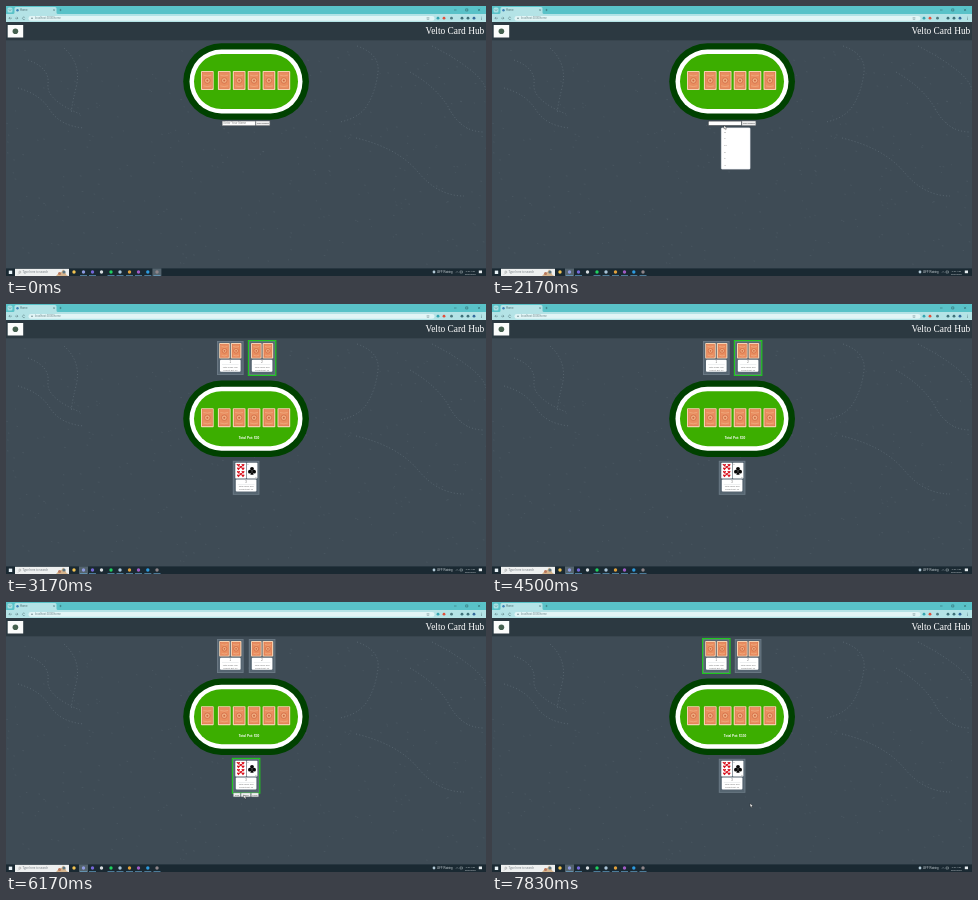
An HTML page for the animation above (8 s loop, 480 by 270 pixels).

```html
<!DOCTYPE html>
<html lang="en">
<head>
<meta charset="utf-8">
<title>Card table</title>
<style>
html, body { margin: 0; width: 100%; height: 100%; overflow: hidden; background: #3e4b55; }
svg { display: block; width: 100vw; height: 100vh; }
text { font-family: "Liberation Sans", Arial, sans-serif; }
.serif { font-family: "Liberation Serif", "Times New Roman", serif; }
</style>
</head>
<body>
<svg id="stage" viewBox="0 0 480 270"></svg>
<script>
const LOOP = 8000, STEP = 1000 / 6;
const stage = document.getElementById('stage');

const rect = (x, y, w, h, fill, more = '') =>
  `<rect x="${x}" y="${y}" width="${w}" height="${h}" fill="${fill}" ${more}/>`;
const dot = (x, y, r, fill, more = '') =>
  `<circle cx="${x}" cy="${y}" r="${r}" fill="${fill}" ${more}/>`;
const label = (x, y, size, fill, str, more = '') =>
  `<text x="${x}" y="${y}" font-size="${size}" fill="${fill}" ${more}>${str}</text>`;
const path = (d, stroke, width, more = '') =>
  `<path d="${d}" fill="none" stroke="${stroke}" stroke-width="${width}" ${more}/>`;
const group = (id, body, more = '') => `<g id="${id}" ${more}>${body}</g>`;
const MID = 'text-anchor="middle"';

function seeded(seed) {
  return () => (seed = (seed * 16807) % 2147483647) / 2147483647;
}

// Dotted contour lines and loose specks over the page background
function contours() {
  const lines = [
    'M22 54Q44 62 42 78T74 108', 'M58 42Q76 58 70 82T66 108', 'M12 82Q34 88 44 104T78 122',
    'M351 40Q374 48 372 66T362 98Q354 112 334 116', 'M426 40Q446 50 462 62T480 84',
    'M404 66Q432 82 444 104T478 126', 'M350 132Q392 142 412 166T458 190'
  ];
  const rnd = seeded(71);
  let specks = '';
  for (let i = 0; i < 330; i++) {
    const x = rnd() * 480, y = 44 + rnd() * 216;
    specks += `M${x.toFixed(1)} ${y.toFixed(1)}l${(0.8 + rnd()).toFixed(1)} .3`;
  }
  return path(specks, '#6f7e89', 0.5, 'opacity=".42"') +
    lines.map(d => path(d, '#82909a', 0.65, 'stroke-dasharray="1 2.2" opacity=".6"')).join('');
}

function browser() {
  const icons = [[432, '#34a4b0'], [438, '#e0503c'], [445.5, '#4d7b81'], [456, '#3d7078'], [462, '#3d7078'], [468, '#336a9c']];
  return rect(0, 0, 480, 8, '#59c2c8') +
    rect(1.5, 1.5, 5, 5, '#a5e0e3', 'rx="1.5"') + path('M3 3.5l1 1 1-1', '#31545a', 0.5) +
    `<path d="M7 8q1.5 0 1.5-1.5V2.5q0-1.5 1.5-1.5H49q1.5 0 1.5 1.5V6.5q0 1.5 1.5 1.5z" fill="#b4e3e6"/>` +
    dot(11.5, 4.2, 1.2, '#3c7fb5') + label(14, 5.2, 2.8, '#4a676b', 'Home') +
    path('M47.2 3.2l1.7 1.7m0-1.7l-1.7 1.7M53.4 4h2.2M54.5 2.9v2.2', '#28474c', 0.35) +
    path('M448 4h2.5M459.7 2.9h2.1v2.1h-2.1zM472 2.9l2.1 2.1m0-2.1l-2.1 2.1', '#1f4449', 0.4) +
    rect(0, 8, 480, 8, '#b4e3e6') +
    path('M6 12.2H2.9l1.2-1.2M2.9 12.2l1.2 1.2M9 12.2h3l-1.2-1.2M12 12.2l-1.2 1.2M18.8 11.5a1.3 1.3 0 1 0 .2 1.4', '#4a6a6f', 0.45) +
    rect(22.5, 9.9, 406, 4.9, '#e2f5f6', 'rx="2.4"') + dot(26, 12.3, 0.8, '#6d878b') +
    label(29, 13.3, 2.8, '#718a8e', 'localhost:3000/home') +
    path('M422 11l.4 1h1l-.8.7.3 1-.9-.6-.9.6.3-1-.8-.7h1z', '#56757a', 0.3) +
    icons.map(([x, c]) => dot(x, 12.2, 1.4, c)).join('') +
    [11, 12.2, 13.4].map(y => dot(475.5, y, 0.35, '#28474c')).join('');
}

function header() {
  return rect(0, 16, 480, 18.3, '#2c3941') +
    rect(1.7, 19, 15.5, 12.5, '#fbfcfb') + dot(9.4, 25.3, 2.8, '#45614f') +
    label(478.3, 28.4, 9.4, '#fff', 'Velto Card Hub', 'class="serif" text-anchor="end"');
}

function taskbar() {
  const apps = [[68, '#f3c451'], [77.5, '#8f9be0'], [86.5, '#7567d8'], [95.5, '#d9dde0'], [105, '#1ed15f'],
    [114, '#a9c4d8'], [123.5, '#e2a13c'], [132.5, '#a15bc4'], [141.8, '#2d9be0'], [151, '#8f8589']];
  return rect(0, 262.4, 480, 7.6, '#1a2932') + rect(2.8, 264.6, 3.4, 3.4, '#e8f2f7') +
    rect(9, 262.8, 54, 7.2, '#eef0f0') + path('M13.2 267.3l-1.2 1.2', '#666', 0.35) +
    dot(13.8, 266.1, 1, 'none', 'stroke="#666" stroke-width=".35"') +
    label(16.5, 267.3, 2.9, '#737c82', 'Type here to search') +
    `<path d="M50 270q2-3 4-3.5t3-3q2 1 2.5 3.5t3 3z" fill="#d5b48c"/>` +
    dot(53.5, 267.6, 1.5, '#b9775c') + dot(58, 266, 1.6, '#5d757f') +
    rect(73, 262.4, 9, 7.6, '#54636d', 'id="leftTask"') + rect(146.4, 262.4, 9, 7.6, '#54636d', 'id="rightTask"') +
    apps.map(([x, c], i) => dot(x, 266, 1.7, c) + (i && i !== 3 ? rect(x - 3.5, 269.4, 7, 0.6, '#6fb3dd') : '')).join('') +
    dot(428, 266, 1.4, '#b4cbd8') + label(431, 267, 2.7, '#d5dde1', '48°F Raining') +
    path('M450 266.6l1.1-1.1 1.1 1.1M454 265h2.4v2h-2.4z', '#c9d3d8', 0.4) +
    label(464.2, 265.6, 2.5, '#d5dde1', '1:47 AM', MID) + label(464.2, 268.8, 2.5, '#d5dde1', '10/3/2023', MID) +
    rect(472.8, 264.5, 3.2, 2.7, '#e7edf0');
}

function cardBack(x, y, w, h) {
  const cx = x + w / 2, cy = y + h / 2;
  return rect(x, y, w, h, '#f6d2b0', 'rx=".8"') +
    rect(x + 1.4, y + 1.4, w - 2.8, h - 2.8, '#e98e60', 'stroke="#d9683f" stroke-width=".5"') +
    dot(cx, cy, w * 0.22, '#f0ae80', 'stroke="#c85f3c" stroke-width=".6"') +
    dot(cx, cy, w * 0.08, '#cf6640') +
    [y + h * 0.22, y + h * 0.78].map(v =>
      path(`M${x + 2.4} ${v}q${w / 2 - 2.4} 1.6 ${w - 4.8} 0`, '#f3bd92', 0.5)).join('');
}

function table() {
  const xs = [195, 211.9, 226.8, 241.7, 256.6, 271.5];
  return rect(177.2, 37.3, 125.8, 76.4, '#004100', 'rx="38.2"') +
    rect(183.5, 43.5, 113, 64, '#fff', 'rx="32"') +
    rect(188, 48, 104, 55, '#3cae00', 'rx="27.5"') +
    xs.map(x => cardBack(x, 65, 12.7, 19)).join('');
}

function heart(x, y, s) {
  return `<path transform="translate(${x} ${y}) scale(${s})" fill="#d80f1c" d="M0 1C-2-.6-.9-1.5 0-.6.9-1.5 2-.6 0 1z"/>`;
}

function openCards() {
  let out = rect(229.3, 158.8, 10.9, 15.6, '#fff', 'rx=".7"') + rect(240.8, 158.8, 10.6, 15.6, '#fff', 'rx=".7"');
  for (const x of [232.5, 237]) for (const y of [161.4, 164.9, 168.4, 171.9]) out += heart(x, y, 1.35);
  out += heart(234.8, 163.1, 1.25) + heart(234.8, 170.2, 1.25);
  out += label(229.6, 161.4, 2, '#d81b25', '10') + label(241.3, 161.4, 2, '#111', 'A') + label(249.3, 173.8, 2, '#111', 'A');
  return out + dot(246, 164.8, 1.9, '#080808') + dot(243.9, 167.7, 1.9, '#080808') + dot(248.1, 167.7, 1.9, '#080808') +
    `<path d="M246 165l.6 3.3 1.1 2.4h-3.4l1.1-2.4z" fill="#080808"/>`;
}

// One seat: panel, two cards, info box
function seat(id, x, y, num, cards) {
  const mid = x + 13.3;
  return rect(x, y, 26.6, 34, '#6b7a86') + rect(x + 0.9, y + 0.9, 24.8, 32.2, '#566571') +
    cards + rect(x + 3, y + 18.8, 20.6, 12, '#fff', 'rx="1"') +
    label(mid, y + 22, 2.6, '#555', num, MID) + rect(x + 5, y + 23.4, 16.6, 0.3, '#c3c8cb') +
    label(mid, y + 26.6, 2.1, '#6a6a6a', 'Total Chips: 980', MID) +
    label(mid, y + 29.5, 2.1, '#6a6a6a', 'Current Bet: 20', MID) +
    rect(x - 0.4, y - 0.4, 27.4, 34.8, 'none', `id="${id}" stroke="#20c520" stroke-width="1.2"`);
}

const backs = x => cardBack(x + 2.2, 39, 10.6, 15.6) + cardBack(x + 13.8, 39, 10.6, 15.6);

function actions() {
  return [['Call', 227.4, 7], ['Raise', 235.1, 9.4], ['Fold', 245.3, 7.2]].map(([s, x, w]) =>
    rect(x, 191, w, 3.7, '#eff0f0', 'stroke="#8a8f94" stroke-width=".3" rx=".5"') +
    label(x + w / 2, 193.7, 2.4, '#444', s, MID)).join('');
}

function dropdown() {
  return rect(229.2, 121.8, 29, 41.4, '#fff', 'rx="1" stroke="#cdd4d9" stroke-width=".3"') +
    ['ab', 'jo', 'me', 'p1', 'te', 'yo'].map((s, i) => label(232, 126.5 + i * 6.7, 2, '#8a8a8a', s)).join('');
}

const joinForm =
  rect(216.3, 115.1, 33, 4.4, '#fff', 'id="field" stroke="#808080" stroke-width=".4"') +
  label(217.4, 118.4, 3, '#858585', 'Enter Your Name', 'id="hint"') +
  rect(249.8, 115.1, 14, 4.4, '#efefef', 'stroke="#777" stroke-width=".4" rx=".4"') +
  label(256.8, 118.3, 2.5, '#333', 'Join Game', MID);

const game =
  seat('ringA', 211, 37, '1', backs(211)) + seat('ringB', 242.8, 37, '2', backs(242.8)) +
  seat('ringC', 226.8, 156.8, '3', openCards()) +
  label(243, 135.3, 3.2, '#fff', '', `id="pot" font-weight="700" ${MID}`) + group('actions', actions());

stage.innerHTML = rect(0, 0, 480, 270, '#3e4b55') + contours() + browser() + header() +
  group('table', table()) + group('form', joinForm) + group('game', game) +
  group('list', dropdown()) + taskbar() +
  group('cursor', '<path d="M0 0v3.6l.9-.8.6 1.4.7-.3-.6-1.4h1.1z" fill="#fff" stroke="#111" stroke-width=".3"/>');

const el = {};
stage.querySelectorAll('[id]').forEach(n => el[n.id] = n);
const show = (id, on) => el[id].setAttribute('visibility', on ? 'visible' : 'hidden');
const set = (id, name, v) => el[id].setAttribute(name, v);

// Pointer keys: time, x, y
const keys = [
  [0, 490, 105], [170, 470, 105], [1170, 236, 117], [2170, 232, 119.5], [2500, 257, 117.5],
  [3170, 490, 92], [5170, 490, 150], [6170, 237, 193], [6500, 231, 193],
  [6830, 240, 193.5], [7330, 258.2, 201.4], [8000, 258.2, 201.4]
];

function pointer(t) {
  const i = Math.max(1, keys.findIndex(k => k[0] >= t));
  const [a, b] = [keys[i - 1], keys[i]];
  const p = (t - a[0]) / (b[0] - a[0]);
  return [a[1] + (b[1] - a[1]) * p, a[2] + (b[2] - a[2]) * p];
}

function draw(t) {
  const q = Math.floor((t + 10) / STEP) * STEP;
  const playing = t >= 2500, mine = t >= 5170 && t < 7670, done = t >= 7670;
  const focus = t >= 1330;
  set('table', 'transform', `translate(0 ${playing ? 39.2 : 0})`);
  show('form', !playing);
  show('game', playing);
  show('ringA', playing && done);
  show('ringB', playing && t < 5170);
  show('ringC', mine);
  show('actions', mine);
  show('hint', !focus);
  set('field', 'stroke', focus ? '#15191c' : '#808080');
  show('list', t >= 1500 && t < 2670);
  set('list', 'opacity', playing ? 0.22 : 1);
  el.pot.textContent = done ? 'Total Pot: $150' : 'Total Pot: $30';
  show('leftTask', focus);
  show('rightTask', !focus);
  const [x, y] = pointer(Math.min(q, LOOP - 1));
  set('cursor', 'transform', `translate(${x.toFixed(2)} ${y.toFixed(2)})`);
}

const start = performance.now();
function tick(now) {
  draw(Math.max(0, now - start) % LOOP);
  requestAnimationFrame(tick);
}
draw(0);
requestAnimationFrame(tick);
</script>
</body>
</html>
```
